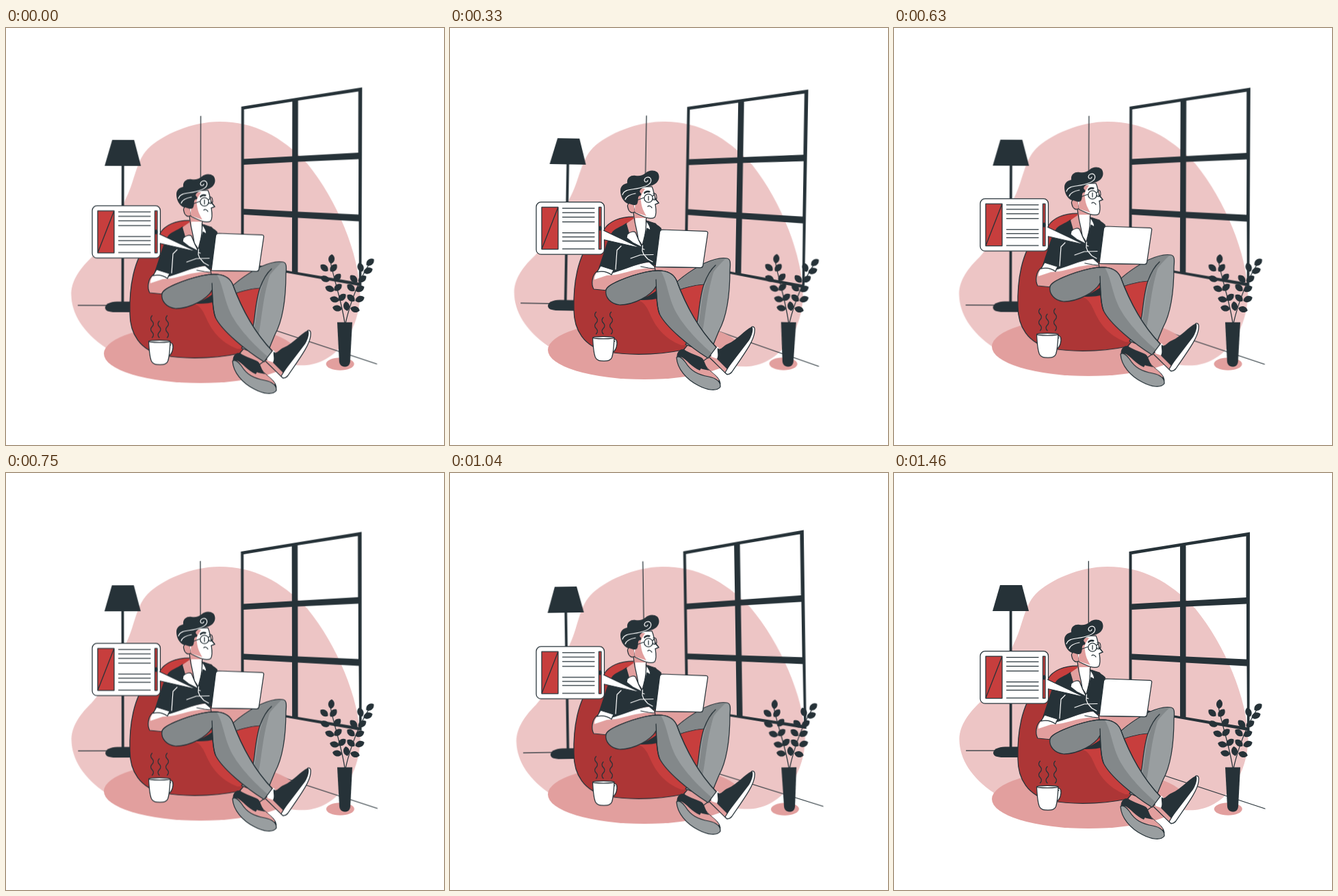
Animation of 640x610 px, one loop 1500 ms. Source, as an HTML page:

```html
<!DOCTYPE html>
<html lang="en">
<head>
<meta charset="utf-8">
<title>Reading at home</title>
<style>
  html, body { margin: 0; width: 100%; height: 100%; overflow: hidden; background: #fff; }
  svg { display: block; width: 100vw; height: 100vh; }
  :root { --ink: #263238; --red: #c73e3d; --deep: #ad3636; --pink: #e29f9e; --pale: #edc5c5; --grey: #999ea0; --shade: #83888a; }
  .ink { fill: var(--ink); }
  .red { fill: var(--red); }
  .deep { fill: var(--deep); }
  .pink { fill: var(--pink); }
  .pale { fill: var(--pale); }
  .grey { fill: var(--grey); }
  .shade { fill: var(--shade); }
  .white { fill: #fff; }
  .none { fill: none; }
  .o { stroke: var(--ink); stroke-width: 1.25; stroke-linejoin: round; stroke-linecap: round; }
  .w { fill: none; stroke: #fff; stroke-width: 1.2; stroke-linecap: round; stroke-linejoin: round; }
  .wind { animation: wind 1.5s linear -.04s infinite; }
  .room { transform-origin: 319px 292px; }
  .plant { transform-origin: 502px 416px; }
  .float { animation: float 1.5s linear -.04s infinite; }
  @keyframes wind {
    0%, 100% { transform: rotate(0deg); }
    25% { transform: rotate(1deg); }
    75% { transform: rotate(-1deg); }
  }
  @keyframes float {
    0%, 100% { transform: translateY(0); }
    50% { transform: translateY(-12.2px); }
  }
</style>
</head>
<body>
<svg viewBox="0 0 640 610">
  <g class="wind room">
    <path class="pale" d="M312 137C272 137 228 156 207 177C189 196 188 226 174 252C163 284 147 311 125 336C104 356 95 374 95.500 391C96 418 113 446 146 468C200 492 350 474 392 487C412 493 428 494 440 493C486 488 517 440 517.500 388C516 330 484 252 440 198C402 158 362 137 312 137Z"/>
    <path class="none o" d="M105.500 406H284L542 491M284.300 129V406"/>
    <path class="ink" fill-rule="evenodd" d="M343.500 115L520 86.500L519.500 377.500L343.500 346Z
      M347.500 119L418 107.500V187.500L347.500 191.500Z M426.500 106L514.500 92.500V182L426.500 187Z
      M347.500 200L418 196V268L347.500 264.500Z M426.500 195.500L515 191.500V272.500L426.500 268.500Z
      M347.500 273L418 277V356L347.500 343Z M426.500 277.500L515.500 282.500L516 372L426.500 357Z"/>
    <path class="ink" d="M155 164H187L197 202H144ZM168.700 200H172.500V402H168.700Z"/>
    <path class="ink" d="M145 409C146 402 156 400.500 166 400.500H186V416H160C150 416 145 414 145 409Z"/>
  </g>

  <g class="wind plant">
    <ellipse class="pink" cx="488.300" cy="491.500" rx="20.500" ry="9.300"/>
    <path class="none o" d="M495 432C491 402 480 372 474 342M496 432C503 402 513 373 532 343"/>
    <g id="leaves" class="ink"></g>
    <path class="ink" d="M484 430.500H506L503 488C502.500 493 499.500 495.500 495.500 495.500C491 495.500 487.500 493 487 488Z"/>
  </g>

  <g class="float">
    <ellipse class="pink" cx="284" cy="477" rx="141" ry="43"/>

    <!-- beanbag -->
    <path class="deep" d="M225 301C232 289 248 282 268 282L300 292L372 380C372 410 362 446 352 474C320 483 268 487 228 479C196 472 181 448 181 418C180 382 186 338 208 316Z"/>
    <path class="red" d="M225 301C232 289 248 282 268 282L280 290L262 306L232 313Z"/>
    <path class="red" d="M274 404L330 372L372 376C371 410 362 440 352 470L338 470C312 460 300 442 292 424C287 412 282 406 274 404Z"/>
    <path class="none o" d="M225 301C232 289 248 282 268 282L300 292L372 380C372 410 362 446 352 474C320 483 268 487 228 479C196 472 181 448 181 418C180 382 186 338 208 316Z"/>

    <!-- mug -->
    <path class="white o" d="M238.500 462C244 459 245 466 243 473C242 477 239 480 236 481M239 465L241 464"/>
    <path class="white o" d="M208.500 459H240C239.500 470 239 481 236.500 488C234.500 493 230 493 225 493C219 493 215 493 212.500 488C209.500 481 209 470 208.500 459Z"/>
    <ellipse class="white o" cx="224.200" cy="459" rx="15.700" ry="1.700"/>
    <path id="steam" class="none o"/>

    <!-- torso -->
    <path class="pink" d="M294 354H372L350 374L332 386L310 370Z"/>
    <path class="ink" d="M274 404C284 401 294 396 302 390V402C293 404 283 404 274 404Z"/>
    <path class="ink" d="M258 291C250 297 240 299 236 306C230 315 224 338 217 358L238 366L272 353L300 353L309 299C304 293 296 291 289 288L280 294Z"/>
    <path class="pink" d="M268 276L287 283L287 304L281 324L262 306L258 292L268 285Z"/>
    <path class="white" d="M271 284L286 284C285 291 288 300 286 307L281 323L275 315C274 304 269 294 271 284Z"/>
    <path class="none o" d="M268 275C269 290 274 303 275 315L281 324L285 308M287 284C285 290 288 298 287 307"/>
    <path class="white o" d="M259 308C263 304 268 303 271 305L276 317L281 327L267 320L258 313Z"/>
    <path class="white o" d="M287 288C290 292 293 296 293 302L288 299L284 316L286 300Z"/>
    <path class="w" d="M281.500 324L281 332L283 337L289 344L296 348M264 343L278 338L297 337.500M250 325L244 331L242 359M281 329L284 330"/>

    <!-- head -->
    <path class="white o" d="M271 238H295C298 244 298 250 300 255L305 262L300 264C301 270 302 279 299 283C293 287 282 282 270 276L266 255Z"/>
    <path class="pink" d="M271 241H285C281 248 277 252 279 259C280 269 283 274 287 281L270 275.500Z"/>
    <path class="pink o" d="M268 262C262 260 258 264 260 269C261 275 266 278 270 275"/>
    <path class="ink" d="M260 263C253 260 249 252 249 244C249 237 254 234 259 233C258 225 264 221 271 222C277 223 281 222 286 218C290 214 298 213 303 217C308 223 305 232 298 235C291 239 283 237 278 243C275 248 281 246 279 251C272 252 277 258 273 264C268 267 265 263 260 263Z"/>
    <path class="w" d="M252 250C255 241 266 243 277 240C290 237 296 232 293 226C290 222 284 225 284 229C285 232 288 232 289 229M256 257C258 251 265 249 271 248"/>
    <path class="none o" stroke-width="1" d="M270 259L284 254M296 252L298 250"/>
    <circle class="white o" cx="290" cy="255" r="6.200"/>
    <path class="none o" d="M297 248C301 247 302 250 302 255C301 258 298 258 296 256M290 252V258M289 267C291 265 294 267 295 269M299 255L305 262L300 264"/>
    <path class="ink" d="M283 247C286 243 290 243 293 245L291 247C288 246 286 247 284 249Z"/>

    <!-- arm -->
    <path class="pink o" d="M216 361C207 367 206 381 210 388L230 390C250 374 278 364 300 361L299 355L291 348C274 349 256 358 237 364Z"/>
    <path class="white" d="M237 364C257 358 274 350 291 349L299 355L297 358C280 355 258 364 241 367L229 368L211 374C211 369 213 364 217 362Z"/>
    <path class="white o" d="M220 354L239 360L236 367C229 362 222 361 215 363Z"/>
    <path class="none o" d="M237 364C257 358 274 350 291 348L299 355M279 355L290 357L298 358"/>

    <!-- far shoe -->
    <path class="pink" d="M346 470L382 486L374 497L370 503L341 480Z"/>
    <path class="none o" d="M348 469L341 477M381 485L369 494"/>
    <path class="ink o" d="M332 487C332 480 337 475 342 477C349 482 357 484 366 488C372 490 370 497 376 504C383 511 394 517 395 526L368 520Z"/>
    <path class="pink" d="M337 487C345 490 354 503 365 507L371 497C374 505 388 512 393 521L389 526L360 518Z"/>
    <path class="ink" d="M336 480C343 478 354 483 364 488C371 492 370 498 379 507L369 505C358 502 348 489 336 484Z"/>
    <path class="grey o" d="M331 488C334 485 340 489 344 495C352 508 362 513 378 516C389 518 396 524 395 531C390 538 376 536 363 529C345 520 332 504 331 488Z"/>

    <!-- far leg -->
    <path class="grey o" d="M318 392C332 374 351 361 372 350C385 344 397 341.500 405 343C410 344 410 350 409 360C409 394 405 427 393 449C388 461 384 470 380 482L344 469C357 454 361 443 363 425C365 407 367 393 371 381C356 382 338 387 328 392Z"/>
    <path class="shade" d="M320 391C334 374 351 362 372 351C385 345 394 343 402 344C389 356 378 372 372 380C356 381 338 386 328 391Z"/>
    <path class="shade" d="M388 354C379 365 372 380 369 398C366 415 365 437 360 448L368 454C374 430 374 395 388 354Z"/>
    <path class="none o" d="M388 353C380 360 375 370 371 381"/>

    <!-- laptop -->
    <path class="white o" d="M310 301L374 303.300C376.500 303.500 377 305 376.500 307L369.500 354C369 356 368 356.500 366 356.500L300 355.500L306.500 304C307 302 308 301 310 301Z"/>
    <path class="none o" d="M299 355.500L368 356.500"/>

    <!-- near shoe -->
    <path class="white" d="M384 482L391 473L398 483L392 493Z"/>
    <path class="pink o" d="M378 487L391 481L409 509L405 513C399 508 393 501 378 487Z"/>
    <path class="white" d="M381 482L391 472L396 478L391 490L382 487Z"/>
    <path class="white o" d="M441 443C445 442 446 446 445 451C444 464 429 484 412 509C408 514 404 513 402 510L425 472Z"/>
    <path class="ink" d="M391 474C396 479 398 471 406 468C420 462 430 448 441 443C444 445 442 455 437 463L405 505L390 490C393 485 390 479 391 474Z"/>

    <!-- near leg -->
    <path class="shade o" d="M228 389C230 381 260 369 286 363C309 358 325 362 331 375C344 411 364 447 389 473L377 489C350 472 315 443 306 424C301 411 302 393 301 384C294 397 270 411 248 411C235 410 226 400 228 389Z"/>
    <path class="grey" d="M308 361.500C321 362 328 367 331 377C344 412 365 448 388 473L382 481C363 465 343 443 334 428C318 403 319 379 308 361.500Z"/>
    <path class="none o" d="M228 389C230 381 260 369 286 363C309 358 325 362 331 375C344 411 364 447 389 473M301 374C302 390 301 411 306 424"/>

    <!-- speech screen -->
    <rect class="white o" x="126" y="260.700" width="99.500" height="76.500" rx="7"/>
    <path class="white o" d="M222 301L279 328L222 315"/>
    <path class="white" d="M220.500 300H224L225 316H220.500Z"/>
    <path class="red o" d="M134 268H158V329.500H134ZL158 268L134 329.500"/>
    <path class="red o" d="M217.500 268H221V329.500H217.500Z"/>
    <ellipse class="ink" cx="219.500" cy="299" rx="2" ry="3.500"/>
    <path class="none o" d="M164.500 269.500H211M164.500 276H211M164.500 282.500H211M164.500 289.500H211M164.500 305.500H211M164.500 311.500H211M164.500 317.500H211M164.500 329H211"/>
  </g>
</svg>
<script>
  // x, y, tilt of each leaf
  const leaves = [
    [475.5, 338, 95], [465, 351, 40], [478.5, 351, -50], [466, 367, 25], [484, 365, -45],
    [473, 381.500, 20], [485, 379.500, -40], [480, 397, 15], [491, 394, -40], [484, 410, 10],
    [497.500, 407, 80], [510, 411.500, 15], [504, 395, 40], [517, 396.500, -20], [504, 380, 40],
    [517, 381.500, -25], [508, 367, 45], [520.500, 367, -35], [518, 350, 70], [529, 355, -20], [532, 342.500, -40]
  ];
  document.getElementById('leaves').innerHTML = leaves.map(([x, y, tilt]) =>
    `<path transform="translate(${x} ${y}) rotate(${tilt})" d="M-7 0C-4 -6 4 -6 7 0C4 6 -4 6 -7 0Z"/>`).join('');

  const wave = (x, y, n) => `M${x} ${y}` + 'q-4 4 0 8q4 4 0 8'.repeat(n);
  document.getElementById('steam').setAttribute('d',
    wave(213.5, 421.5, 2) + wave(224, 429.5, 1) + 'q-4 4 0 8' + wave(235.5, 421.5, 2));
</script>
</body>
</html>
```
